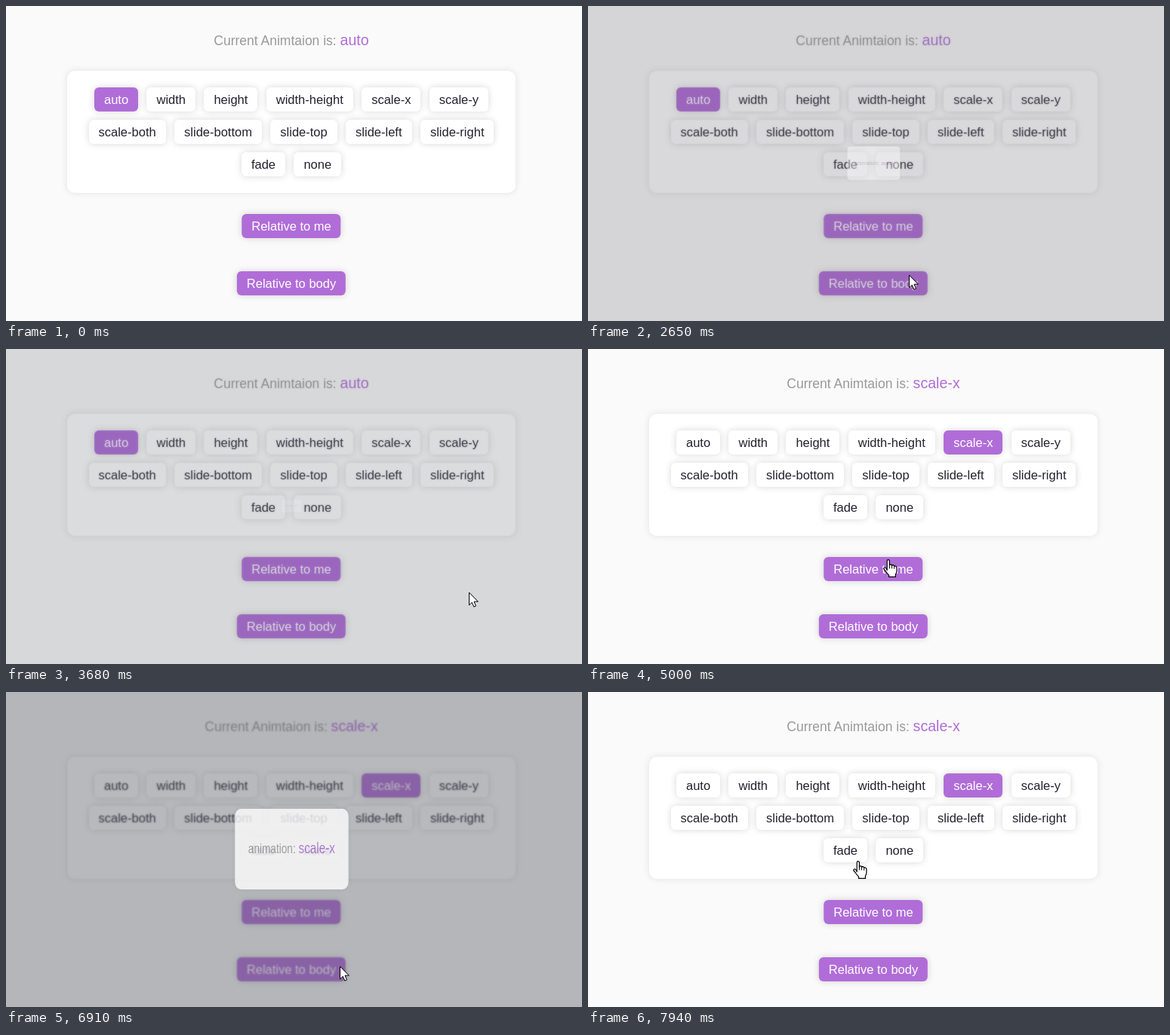
An HTML page that plays this animation: 763 px wide and 418 px high, repeating every 8 s.

```html
<!DOCTYPE html>
<html lang="en">
<head>
<meta charset="utf-8">
<title>Popover animations</title>
<style>
  :root { --purple: #b06dd8; --loop: 8s; }
  * { box-sizing: border-box; }
  html, body { margin: 0; width: 100%; height: 100%; overflow: hidden; }
  body {
    position: relative;
    background: #fafafa;
    font: 16.5px/32px "Liberation Sans", Arial, sans-serif;
    color: #23212f;
    white-space: nowrap;
  }

  .title, .panel, .trigger, .pop, .overlay, .cursor, .cursor svg { position: absolute; }

  .title, .pop { color: #999; font-size: 17.5px; }
  .title b, .pop b { color: var(--purple); font-weight: 400; font-size: 19.6px; line-height: 0; }
  .title { left: 0; top: 26px; width: 756px; margin: 0; line-height: 40px; text-align: center; }

  .panel {
    left: 81px; top: 86px; width: 594px; height: 162px;
    padding-top: 22px;
    border-radius: 10px;
    background: #fff;
    box-shadow: 0 0 10px rgba(0, 0, 0, .1);
  }
  .row { display: flex; justify-content: center; gap: 11.4px; margin-bottom: 11.2px; }
  .chip, .trigger {
    height: 32px;
    padding: 0 13px;
    border-radius: 6px;
    background: #fff;
    box-shadow: 0 0 10px rgba(0, 0, 0, .16);
  }
  .trigger { left: 378px; transform: translateX(-50%); background: var(--purple); color: #fff; }

  /* selection moves from auto to scale-x */
  .chip.before { animation: select-before var(--loop) step-end infinite; }
  .chip.after { animation: select-after var(--loop) step-end infinite; }
  .title.before { animation: show-before var(--loop) step-end infinite; }
  .title.after { animation: show-after var(--loop) step-end infinite; }
  @keyframes select-before { 0% { background: var(--purple); color: #fff; } 53%, 100% { background: #fff; color: #23212f; } }
  @keyframes select-after { 0% { background: #fff; color: #23212f; } 53%, 100% { background: var(--purple); color: #fff; } }
  @keyframes show-before { 0% { visibility: visible; } 53%, 100% { visibility: hidden; } }
  @keyframes show-after { 0% { visibility: hidden; } 53%, 100% { visibility: visible; } }

  .pop {
    height: 107px;
    padding: 0 22.5px;
    line-height: 107px;
    border-radius: 10px;
    background: #fff;
    box-shadow: 0 0 10px rgba(0, 0, 0, .08);
    --closed: scale(0);
  }
  .pop.wide { --closed: scaleX(0); }
  .near { left: 312px; top: 169px; transform-origin: 50% 100%; animation: near var(--loop) ease infinite; }
  .near.wide { animation-delay: -3.88s; }
  .near::after {
    content: "";
    position: absolute; left: 64px; top: 100%;
    border: solid transparent;
    border-width: 8px 10px 0;
    border-top-color: #fff;
  }
  .center { left: 0; right: 7px; top: 155px; width: fit-content; margin: 0 auto; animation: center-auto var(--loop) ease infinite; }
  .center.wide { animation-name: center-wide; }

  @keyframes near {
    0%, 11.5%, 26.75%, 100% { opacity: 0; transform: var(--closed); }
    16.5%, 21.75% { opacity: 1; transform: none; }
  }
  @keyframes center-auto {
    0%, 31.875%, 48.25%, 100% { opacity: 0; transform: var(--closed); }
    36.875%, 43.25% { opacity: 1; transform: none; }
  }
  @keyframes center-wide {
    0%, 84%, 96.5%, 100% { opacity: 0; transform: var(--closed); }
    89%, 91.5% { opacity: 1; transform: none; }
  }

  .overlay {
    inset: 0;
    background: rgba(82, 84, 92, .52);
    backdrop-filter: blur(1px);
    animation: overlay var(--loop) ease infinite;
  }
  @keyframes overlay {
    0%, 31.875%, 51.2%, 84%, 99%, 100% { opacity: 0; }
    36.875%, 43.25%, 89%, 91.5% { opacity: 1; }
  }

  .cursor { left: 0; top: 0; animation: move var(--loop) ease-in-out infinite; }
  .cursor svg { overflow: visible; fill: #fff; stroke: #000; stroke-linejoin: round; stroke-linecap: round; }
  .arrow { left: 0; top: 0; animation: arrow var(--loop) step-end infinite; }
  .hand { left: -6px; top: 0; animation: hand var(--loop) step-end infinite; }

  @keyframes move {
    0%, 3.25% { transform: translate(646px, 382px); }
    9.375%, 15% { transform: translate(402px, 305px); }
    19.5%, 26% { transform: translate(517px, 328px); }
    30.5%, 34.75% { transform: translate(425px, 357px); }
    38.5%, 48% { transform: translate(613px, 323px); }
    52%, 56% { transform: translate(515px, 124px); }
    62.25%, 66.25% { transform: translate(397px, 279px); }
    70.75%, 77.5% { transform: translate(540px, 350px); }
    82.75%, 84% { transform: translate(440px, 360px); }
    85%, 87.5% { transform: translate(442px, 364px); }
    91.25%, 93.5% { transform: translate(560px, 320px); }
    99.125%, 100% { transform: translate(357px, 224px); }
  }
  @keyframes arrow {
    0%, 9.1%, 29.75%, 51%, 61.75%, 81.9%, 98.75%, 100% { visibility: hidden; }
    3.25%, 15.4%, 32.25%, 58.75%, 66.75%, 84.25% { visibility: visible; }
  }
  @keyframes hand {
    0%, 15.4%, 32.25%, 58.75%, 66.75%, 84.25% { visibility: hidden; }
    9.1%, 29.75%, 51%, 61.75%, 81.9%, 98.75%, 100% { visibility: visible; }
  }
</style>
</head>
<body>
  <p class="title before">Current Animtaion is: <b>auto</b></p>
  <p class="title after">Current Animtaion is: <b>scale-x</b></p>

  <div class="panel">
    <div class="row">
      <span class="chip before">auto</span>
      <span class="chip">width</span>
      <span class="chip">height</span>
      <span class="chip">width-height</span>
      <span class="chip after">scale-x</span>
      <span class="chip">scale-y</span>
    </div>
    <div class="row">
      <span class="chip">scale-both</span>
      <span class="chip">slide-bottom</span>
      <span class="chip">slide-top</span>
      <span class="chip">slide-left</span>
      <span class="chip">slide-right</span>
    </div>
    <div class="row">
      <span class="chip">fade</span>
      <span class="chip">none</span>
    </div>
  </div>

  <div class="trigger" style="top: 276px">Relative to me</div>
  <div class="trigger" style="top: 352px">Relative to body</div>

  <div class="pop near">animation: <b>auto</b></div>
  <div class="pop near wide">animation: <b>scale-x</b></div>

  <div class="overlay"></div>
  <div class="pop center">animation: <b>auto</b></div>
  <div class="pop center wide">animation: <b>scale-x</b></div>

  <div class="cursor">
    <svg class="arrow" width="12" height="20">
      <path d="M.5 .5V16.9L4.3 13.3 6.8 19.2 9.5 18 7 12.2H12Z"/>
    </svg>
    <svg class="hand" width="19" height="24">
      <path stroke-width="1.2" d="M5.2 14.6V2.4Q5.2 .6 6.8 .6T8.4 2.4V8.2Q8.6 6.8 10 6.9T11.6 8.6Q11.9 7.5 13.2 7.7T14.7 9.5Q15.1 8.7 16.3 9T17.9 11V15.6Q17.9 18 16.4 20.2V23.4H7.6V21.2Q5.2 18.8 3.6 16.2L1 13Q.4 11.6 1.6 11T4 12.2Z"/>
      <path fill="none" d="M8.4 8.2V12M11.6 8.6V12M14.7 9.5V12.4"/>
    </svg>
  </div>
</body>
</html>
```
